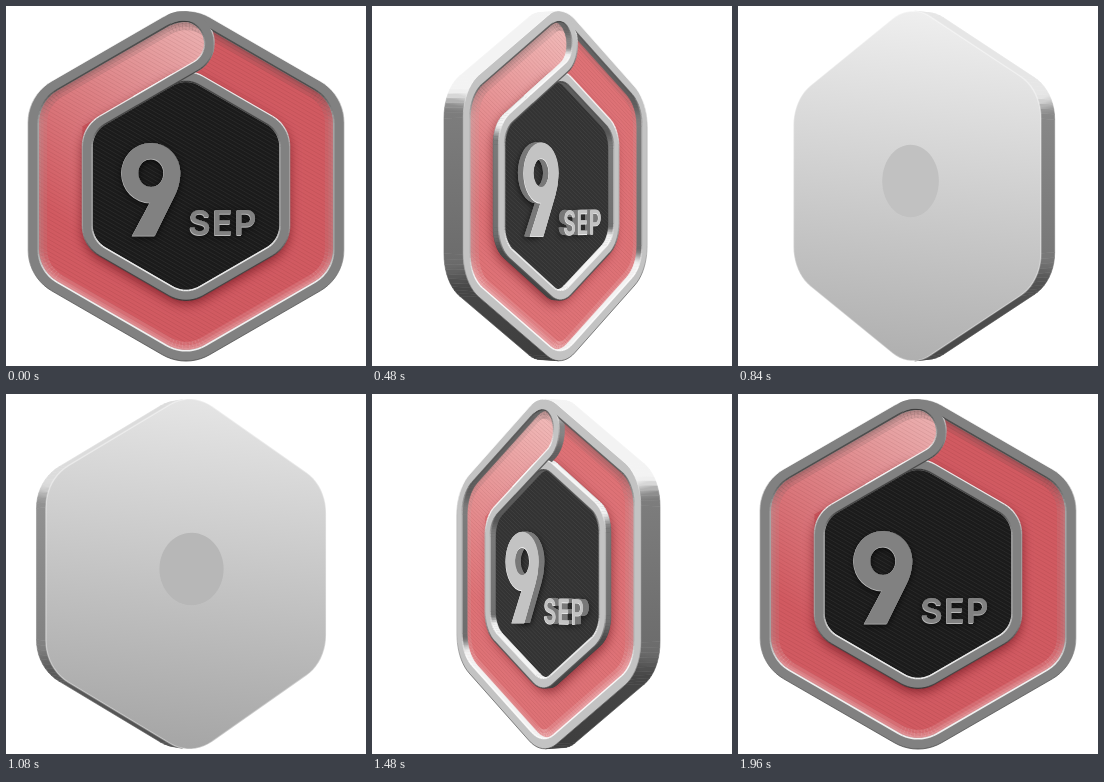
An HTML page with a canvas that plays this animation: 360 by 360 pixels, repeating every 2 s.

```html
<!DOCTYPE html>
<html lang="en">
<head>
<meta charset="utf-8">
<title>Rotating date badge</title>
<style>
html, body { margin: 0; width: 100%; height: 100%; overflow: hidden; background: #fff; }
canvas { display: block; width: 360px; height: 360px; }
</style>
</head>
<body>
<canvas id="stage" width="360" height="360"></canvas>
<script>
const ctx = document.getElementById('stage').getContext('2d');
const LOOP = 2000, TURN = 1960, STEP = 40;
const CAMERA = 1900, FRONT = 11.5, BACK = -11.5, FLOOR = 5;
const RAD = Math.PI / 180;

const clamp = (v, lo, hi) => Math.min(hi, Math.max(lo, v));
const smooth = v => { v = clamp(v, 0, 1); return v * v * (3 - 2 * v); };
const mix = (a, b, t) => a + (b - a) * t;
const gray = (v, a = 1) => { v = Math.round(clamp(v, 0, 255)); return `rgba(${v},${v},${v},${a})`; };

// Closed rounded hexagon, vertex on top; each point keeps its outward angle.
function hex(half, radius) {
  const pts = [], reach = (half - radius) / Math.cos(30 * RAD);
  for (let i = 0; i < 6; i++) {
    const corner = (30 + 60 * i) * RAD;
    for (let j = 0; j <= 10; j++) {
      const dir = (60 * i + 6 * j) * RAD;
      pts.push({
        x: reach * Math.cos(corner) + radius * Math.cos(dir),
        y: reach * Math.sin(corner) + radius * Math.sin(dir),
        dir
      });
    }
  }
  pts.push({ ...pts[0], dir: 2 * Math.PI });
  return pts;
}

const rim = { out: hex(157, 47), in: hex(147, 38) };
const core = { out: hex(103, 34), in: hex(93.5, 26) };
const disc = Array.from({ length: 60 }, (_, i) => ({
  x: 36 * Math.cos(i * 6 * RAD), y: -5 + 36 * Math.sin(i * 6 * RAD)
}));

// Folded end of the band: a half circle joining the core's edge to the rim's.
function curl(r, turn) {
  const cx = -3.5, cy = -142.3, pts = [];
  for (let a = 60; a >= -120; a -= 5)
    pts.push({ x: cx + r * Math.cos(a * RAD), y: cy + r * Math.sin(a * RAD), dir: a * RAD + turn });
  const { x, y, dir } = pts[0];
  return [{ x: x - 60, y: y + 34.6, dir }, ...pts];
}
const foldOut = curl(31.5, 0), foldIn = curl(22, Math.PI);
const fold = [...foldOut.toReversed(), ...foldIn];
const foldArea = [{ x: -103, y: 150 }, { x: -103, y: -59.5 }, ...foldIn, { x: -200, y: -100 }, { x: -200, y: 150 }];

const nine = new Path2D(
  'M-64-13A29.2 29.8 0 0 1-5.6-13A29.2 29.8 0 0 1-64-13Z' +
  'M-47.5-13A12.7 14 0 0 0-22.1-13A12.7 14 0 0 0-47.5-13Z' +
  'M-5.8-10Q-6.5 0-11 9L-31 49.5H-53.5L-35 15L-19 6Z');

let sin = 0, cos = 1, side = 0;

function proj(x, y, z) {
  const p = CAMERA / (CAMERA - z * cos + x * sin);
  return [180 + (x * cos + z * sin) * p, 180 + y * p];
}

function trace(pts, z) {
  pts.forEach((p, i) => ctx[i ? 'lineTo' : 'moveTo'](...proj(p.x, p.y, z)));
  ctx.closePath();
}

function fill(color, z, ...shapes) {
  ctx.beginPath();
  shapes.forEach(s => trace(s, z));
  ctx.fillStyle = color;
  ctx.fill('evenodd');
}

function clipTo(pts, z, draw) {
  ctx.save();
  ctx.beginPath();
  trace(pts, z);
  ctx.clip();
  draw();
  ctx.restore();
}

function shadowed(color, blur, dy, draw) {
  ctx.save();
  ctx.shadowColor = color;
  ctx.shadowBlur = blur;
  ctx.shadowOffsetY = dy;
  draw();
  ctx.restore();
}

function wallTone(dir, y) {
  const ny = Math.sin(dir);
  const mid = 165 - 60 * side - y * 0.12;
  const lit = mix(mid, 190 + 65 * side, smooth((-ny - 0.1) / 0.45));
  return lit - 35 * smooth((ny - 0.1) / 0.6);
}

// Walls that face the camera; flip = 1 for the inside of a recess.
function walls(pts, z0, z1, flip = 0) {
  const turn = flip * Math.PI, sign = flip ? -1 : 1;
  pts.forEach((p, i) => {
    const q = pts[(i + 1) % pts.length];
    const nx = sign * (q.y - p.y), ny = sign * (p.x - q.x);
    if (nx * (-sin * CAMERA - p.x) - ny * p.y <= 0) return;
    const a = proj(p.x, p.y, z1), b = proj(q.x, q.y, z1);
    const tone = ctx.createLinearGradient(...a, ...b);
    tone.addColorStop(0, gray(wallTone(p.dir + turn, p.y)));
    tone.addColorStop(1, gray(wallTone(q.dir + turn, q.y)));
    ctx.beginPath();
    [a, b, proj(q.x, q.y, z0), proj(p.x, p.y, z0)].forEach(v => ctx.lineTo(...v));
    ctx.closePath();
    ctx.fillStyle = ctx.strokeStyle = tone;
    ctx.lineWidth = 0.6;
    ctx.fill();
    ctx.stroke();
  });
}

// Edge line, light where it faces up and dark where it faces down.
function bevel(pts, sign, width, alpha = 0.85) {
  ctx.lineWidth = width;
  for (let i = 1; i < pts.length; i++) {
    const p = pts[i - 1], q = pts[i];
    const ny = sign * Math.sin((p.dir + q.dir) / 2);
    ctx.strokeStyle = gray(165 - 115 * ny + 20 * side, alpha);
    ctx.beginPath();
    ctx.moveTo(...proj(p.x, p.y, FRONT));
    ctx.lineTo(...proj(q.x, q.y, FRONT));
    ctx.stroke();
  }
}

function hatch(color) {
  ctx.strokeStyle = color;
  ctx.lineWidth = 1;
  ctx.beginPath();
  for (let y = -280; y < 280; y += 4) {
    ctx.moveTo(...proj(-160, y - 92, FLOOR));
    ctx.lineTo(...proj(160, y + 92, FLOOR));
  }
  ctx.stroke();
}

// Runs draw() in badge coordinates, flattened around (x, y) at depth z.
function onPlane(x, y, z, color, draw) {
  const [px, py] = proj(x, y, z), [qx, qy] = proj(x + 1, y, z);
  const [, ry] = proj(x, y + 1, z);
  ctx.save();
  ctx.transform(qx - px, qy - py, 0, ry - py, px, py);
  ctx.translate(-x, -y);
  ctx.fillStyle = color;
  draw();
  ctx.restore();
}

function raised(x, y, metal, draw) {
  shadowed('rgba(0,0,0,.7)', 6, 2, () => onPlane(x, y, FLOOR, gray(metal * 0.6), draw));
  for (let z = FLOOR; z < 12; z += 0.5) onPlane(x, y, z, gray(metal * 0.62), draw);
  onPlane(x, y, 12, gray(metal + 55), () => { ctx.translate(-0.5, 0.6); draw(); });
  onPlane(x, y, 12, gray(metal), draw);
}

function drawSep() {
  ctx.font = '600 34px Inter, sans-serif';
  ctx.letterSpacing = '1.5px';
  ctx.textAlign = 'center';
  ctx.fillText('SEP', 37, 49);
}

function drawField() {
  const red = `rgb(${209 + 16 * side},${90 + 30 * side},${97 + 26 * side})`;
  fill(red, FRONT, rim.in);
  clipTo(foldArea, FRONT, () => {
    const glow = ctx.createLinearGradient(...proj(10, -150, FRONT), ...proj(-140, 20, FRONT));
    glow.addColorStop(0, 'rgba(255,240,235,.55)');
    glow.addColorStop(0.5, 'rgba(255,240,235,.25)');
    glow.addColorStop(1, 'rgba(255,240,235,0)');
    fill(glow, FRONT, rim.in);
  });
  hatch('rgba(70,0,10,.08)');
  for (const width of [18, 11, 6]) bevel(rim.in, -1, width, 0.12);
  walls(rim.in, FLOOR, FRONT, 1);
  shadowed('rgba(80,0,10,.6)', 12, 4, () => fill(gray(30), FLOOR, core.out));
  walls(core.out, FLOOR, FRONT);
  walls(fold, FLOOR, FRONT);
}

function drawCore() {
  fill(gray(27 + 30 * side), FRONT, core.in);
  hatch('rgba(255,255,255,.06)');
  walls(core.in, FLOOR, FRONT, 1);
}

function drawFront() {
  const metal = 129 + 90 * side ** 1.5;

  clipTo(rim.in, FRONT, drawField);
  clipTo(core.in, FRONT, drawCore);

  fill(gray(metal), FRONT, core.out, core.in);
  bevel(core.out, 1, 1.3);
  bevel(core.in, -1, 1.5);

  fill(gray(metal), FRONT, rim.out, rim.in);
  bevel(rim.out, 1, 0.8);
  bevel(rim.in, -1, 1.5);

  fill(gray(metal), FRONT, fold);
  clipTo(rim.in, FRONT, () => {
    bevel(foldOut, 1, 1.3);
    bevel(foldIn, 1, 1.3);
  });

  raised(-35, 4, metal, () => ctx.fill(nine));
  raised(37, 37, metal, drawSep);
}

function drawBack() {
  const base = 165 + 65 * side;
  const sheen = ctx.createLinearGradient(200, 5, 160, 355);
  sheen.addColorStop(0, gray(base + 34));
  sheen.addColorStop(1, gray(base - 30));
  fill(sheen, BACK, rim.out);
  ctx.beginPath();
  trace(rim.out, BACK);
  ctx.strokeStyle = 'rgba(255,255,255,.35)';
  ctx.lineWidth = 1.5;
  ctx.stroke();
  fill(gray(base - 12), BACK - 1, disc);
}

function draw(time) {
  const angle = 2 * Math.PI * smooth(time / TURN);
  sin = Math.sin(angle);
  cos = Math.cos(angle);
  side = Math.abs(sin);

  ctx.fillStyle = '#fff';
  ctx.fillRect(0, 0, 360, 360);
  walls(rim.out, BACK, FRONT);
  if (cos * CAMERA > FRONT) drawFront();
  else if (cos * CAMERA < BACK) drawBack();
}

const start = performance.now();
function tick() {
  const time = (performance.now() - start) % LOOP;
  draw(Math.floor(time / STEP) * STEP);
  requestAnimationFrame(tick);
}
tick();
</script>
</body>
</html>
```
